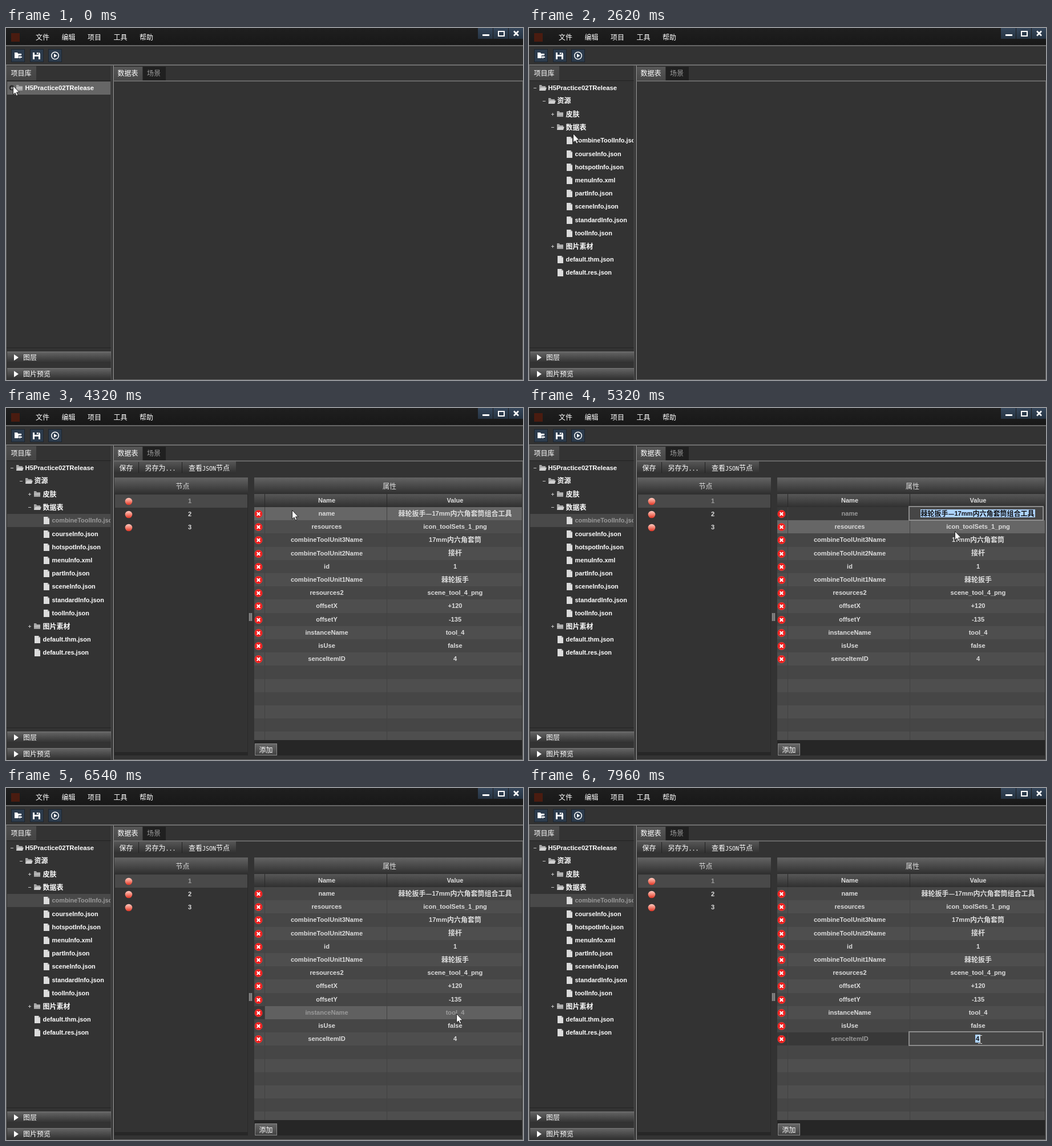
These frames come from a looping animation (906 px wide and 618 px high, 8000 ms). An HTML page with a canvas:

```html
<!DOCTYPE html>
<html lang="zh-CN">
<head>
<meta charset="utf-8">
<style>
html, body { margin: 0; width: 100%; height: 100%; overflow: hidden; background: #333; }
canvas { display: block; }
</style>
</head>
<body>
<canvas id="stage" width="906" height="618"></canvas>
<script>
const ctx = document.getElementById('stage').getContext('2d');
const LOOP = 8000, PITCH = 23.2;
const TREE_Y = 93.6, PROP_Y = 174;
const WHITE = '#fff', LIGHT = '#ddd', GREY = '#9a9a9a', BASE = '#333', HOVER = '#666', PICKED = '#494949', DARK = '#383838';

// name, depth, kind, stage at which it appears, stage at which it opens
const tree = [
  ['H5Practice02TRelease', 0, 'dir', 0, 1],
  ['资源', 1, 'dir', 1, 2],
  ['皮肤', 2, 'dir', 2, 9],
  ['数据表', 2, 'dir', 2, 3],
  ...['combineToolInfo.json', 'courseInfo.json', 'hotspotInfo.json', 'menuInfo.xml', 'partInfo.json',
    'sceneInfo.json', 'standardInfo.json', 'toolInfo.json'].map(n => [n, 3, 'file', 3]),
  ['图片素材', 2, 'dir', 2, 9],
  ['default.thm.json', 2, 'file', 2],
  ['default.res.json', 2, 'file', 2]
];
const props = [
  ['name', '棘轮扳手—17mm内六角套筒组合工具'],
  ['resources', 'icon_toolSets_1_png'],
  ['combineToolUnit3Name', '17mm内六角套筒'],
  ['combineToolUnit2Name', '接杆'],
  ['id', '1'],
  ['combineToolUnit1Name', '棘轮扳手'],
  ['resources2', 'scene_tool_4_png'],
  ['offsetX', '+120'],
  ['offsetY', '-135'],
  ['instanceName', 'tool_4'],
  ['isUse', 'false'],
  ['senceItemID', '4']
];

// cursor moves: first step, last step, number of steps, x, y
const moves = [
  [470, 850, 6, 27, 122], [1080, 1540, 7, 38, 162], [1620, 1770, 3, 39, 170], [1850, 1930, 2, 44, 173],
  [2540, 2850, 5, 127, 203], [3540, 3860, 5, 326, 163], [4320, 4320, 1, 501, 179], [4400, 4700, 5, 739, 186],
  [5240, 5780, 8, 768, 305], [5860, 5940, 2, 778, 328], [6020, 6240, 4, 789, 396],
  [6790, 6870, 2, 789, 416], [7245, 7420, 3, 786, 440]
];
// table edits: pressed, field opens, closes, row
const edits = [[5160, 5160, 6390, 0], [6390, 6710, 7090, 9], [7090, 7170, 7780, 10], [7780, 7870, 8000, 11]];

function cursorAt(t) {
  let x = 12, y = 101;
  for (const [a, b, n, tx, ty] of moves) {
    if (t < a) break;
    const k = n === 1 ? 1 : Math.min(n, Math.floor((t - a) / ((b - a) / (n - 1)) + 0.001) + 1) / n;
    x += (tx - x) * k;
    y += (ty - y) * k;
  }
  return { x: Math.round(x), y: Math.round(y) };
}

function box(x, y, w, h, fill) {
  ctx.fillStyle = fill;
  ctx.fillRect(x, y, w, h);
}
function fade(x, y, w, h, top, bottom) {
  const g = ctx.createLinearGradient(0, y, 0, y + h);
  g.addColorStop(0, top);
  g.addColorStop(1, bottom);
  box(x, y, w, h, g);
}
function poly(points, fill, line) {
  ctx.beginPath();
  for (let i = 0; i < points.length; i += 2) ctx.lineTo(points[i], points[i + 1]);
  ctx.closePath();
  ctx.fillStyle = fill;
  ctx.fill();
  if (line) { ctx.strokeStyle = line; ctx.lineWidth = 1; ctx.stroke(); }
}
function disc(x, y, r, fill) {
  ctx.beginPath();
  ctx.arc(x, y, r, 0, 7);
  ctx.fillStyle = fill;
  ctx.fill();
}
function cross(x, y, r, width) {
  ctx.strokeStyle = WHITE;
  ctx.lineWidth = width;
  ctx.beginPath();
  ctx.moveTo(x - r, y - r); ctx.lineTo(x + r, y + r);
  ctx.moveTo(x + r, y - r); ctx.lineTo(x - r, y + r);
  ctx.stroke();
}

// Chinese and Latin runs use different fonts; returns the width
function text(s, x, cy, color = WHITE, { bold = false, size = 11.1, center = false } = {}) {
  const runs = s.match(/[\u2014\u2e80-\uffef]+|[^\u2014\u2e80-\uffef]+/g).map(str => {
    const cjk = /[\u2014\u2e80-\uffef]/.test(str);
    const font = cjk ? `${bold ? 'bold ' : ''}12px "Noto Sans CJK SC", "Noto Sans CJK", sans-serif`
      : bold ? `bold ${size}px "Liberation Sans", Arial, sans-serif`
      : '10px "DejaVu Sans Mono", monospace';
    ctx.font = font;
    return { str, font, dy: cjk ? 4.5 : 4, w: ctx.measureText(str).width };
  });
  const width = runs.reduce((sum, r) => sum + r.w, 0);
  if (center) x -= width / 2;
  ctx.fillStyle = color;
  for (const r of runs) {
    ctx.font = r.font;
    ctx.fillText(r.str, x, Math.round(cy + r.dy));
    x += r.w;
  }
  return width;
}
const label = (s, x, y, color) => text(s, x, y, color, { center: true });
const strong = (s, x, y, color) => text(s, x, y, color, { center: true, bold: true });

function drawFrame() {
  box(0, 0, 906, 618, BASE);
  fade(0, 0, 906, 30, '#1f1f1f', '#181818');
  box(0, 30, 906, 2, '#676767');
  box(9, 9, 15, 15, '#4a1c10');
  ['文件', '编辑', '项目', '工具', '帮助'].forEach((s, i) => text(s, 52 + i * 45.5, 16));

  for (let i = 0; i < 3; i++) fade(827 + i * 27, 0, 26, 19, '#35465a', '#263443');
  box(835, 11, 12, 3, WHITE);
  ctx.strokeStyle = WHITE;
  ctx.lineWidth = 2;
  ctx.strokeRect(863, 6, 10, 8);
  cross(894, 9.5, 4, 2.6);

  for (const x of [9, 42, 74]) {
    box(x, 37, 24, 23, '#1c242d');
    box(x + 1, 38, 22, 21, '#2d3c4d');
  }
  poly([15, 43, 20, 43, 21, 45, 27, 45, 27, 48, 22, 48, 22, 53, 15, 53], WHITE);
  poly([22, 51, 25, 48.5, 25, 50, 28, 50, 28, 52, 25, 52, 25, 54], WHITE);
  poly([47, 43, 58, 43, 60, 45, 60, 55, 47, 55], WHITE);
  box(50, 43, 7, 4, '#2d3c4d');
  box(54, 43, 2, 3, WHITE);
  box(50, 50, 7, 5, '#2d3c4d');
  ctx.lineWidth = 1.5;
  ctx.beginPath();
  ctx.arc(86, 48.5, 6.3, 0, 7);
  ctx.stroke();
  poly([84, 45, 89.5, 48.5, 84, 52], WHITE);

  box(0, 64, 906, 2, '#707070');
  fade(1, 67, 52, 26, '#4d4d4d', '#444');
  label('项目库', 26.5, 79.5);
  box(1, 92, 184, 1, '#222');
  box(0, 66, 1, 552, '#666');
  box(184, 66, 1, 552, '#5c5c5c');
  box(185, 66, 2, 552, '#282828');
  box(187, 66, 2, 552, '#747474');
  fade(189, 68, 50, 24, '#575757', '#484848');
  label('数据表', 213.5, 79.5);
  box(240, 68, 40, 24, '#202020');
  label('场景', 259, 79.5, GREY);
  box(188, 92, 718, 2, '#686868');
  box(905, 93, 1, 525, '#686868');
  box(188, 617, 718, 1, '#686868');

  box(1, 561, 183, 1, '#242424');
  for (const [s, y] of [['图层', 568], ['图片预览', 597]]) {
    fade(2, y, 182, 20, '#666', '#303030');
    box(2, y, 182, 1, '#777');
    poly([14, y + 5, 22, y + 10.5, 14, y + 16], WHITE);
    text(s, 30, y + 10);
  }
}

function folder(x, y, open) {
  poly([x, y - 5, x + 4, y - 5, x + 5, y - 3, x + 11, y - 3, x + 11, y + 5, x, y + 5], '#a5a5a5');
  if (open) poly([x + 2.5, y - 0.5, x + 13, y - 0.5, x + 11, y + 5, x, y + 5], '#d0d0d0');
  else fade(x, y - 1, 11, 6, '#c0c0c0', '#999');
}
function page(x, y) {
  poly([x, y - 6, x + 7, y - 6, x + 10, y - 3, x + 10, y + 7, x, y + 7], '#dcdcdc');
  poly([x + 7, y - 6, x + 10, y - 3, x + 7, y - 3], '#999');
}

function drawTree(t, cur) {
  const stage = t < 250 ? 0 : t < 1000 ? 1 : t < 2160 ? 2 : 3;
  const firstHot = [0, 1, 2, 4][stage];
  const over = cur.x < 184 ? Math.floor((cur.y - TREE_Y) / PITCH) : -1;
  ctx.save();
  ctx.beginPath();
  ctx.rect(2, 93, 181, 460);
  ctx.clip();
  tree.filter(r => r[3] <= stage).forEach(([name, depth, kind, , opens], i) => {
    const top = Math.round(TREE_Y + i * PITCH), c = TREE_Y + 11 + i * PITCH;
    const cy = Math.round(c), x = Math.round(depth * 15.6);
    const picked = name === 'combineToolInfo.json' && t >= 3000;
    const hot = i === over && i >= firstHot;
    if (picked && t >= 3150) box(2, top, 182, 23, PICKED);
    else if (hot) box(2, top, 182, 23, HOVER);
    if (kind === 'dir') {
      const open = stage >= opens;
      if (hot) disc(x + 10, cy, 4.5, '#2a2a2a');
      box(x + 8, cy, 5, 1, '#c4c4c4');
      if (!open) box(x + 10, cy - 2, 1, 5, '#c4c4c4');
      folder(x + 18, cy, open);
    } else page(x + 19, cy);
    text(name, x + 33.5, c, picked ? GREY : WHITE, { bold: true, size: depth ? 10.9 : 11.3 });
  });
  ctx.restore();
}

function drawNodes(t, cur) {
  fade(189, 94, 214, 21, '#565656', '#303030');
  box(232, 95, 1, 19, '#222');
  box(308, 95, 1, 19, '#222');
  label('保存', 210.5, 105.5);
  label('另存为...', 270.5, 105.5);
  label('查看JSON节点', 356, 105.5);

  fade(190, 122, 234, 29, '#636363', '#2f2f2f');
  label('节点', 309.5, 137, LIGHT);
  box(190, 151, 1, 454, '#292929');
  box(423, 151, 1, 454, '#292929');
  box(190, 604, 234, 6, '#272727');
  const hot = cur.x > 190 && cur.x < 424 && cur.y >= 152 && cur.y < 175;
  box(191, 152, 232, 23, hot ? HOVER : PICKED);
  for (let i = 0; i < 3; i++) {
    const y = Math.round(164 + i * PITCH);
    const g = ctx.createLinearGradient(0, y - 6, 0, y + 6);
    g.addColorStop(0, '#ffc9be');
    g.addColorStop(0.5, '#f48474');
    g.addColorStop(1, '#e03626');
    disc(215, y, 6.3, g);
    strong(String(i + 1), 322, 163 + i * PITCH, i ? LIGHT : GREY);
  }
  for (let i = 0; i < 3; i++) box(426 + i * 2, 360, 1, 14, '#bbb');
}

function drawField(row, value, cy) {
  const top = Math.round(PROP_Y + row * PITCH) - 2;
  box(665, top, 237, 26, '#8c8c8c');
  box(667, top + 2, 233, 22, '#464646');
  const wide = Math.ceil(strong(value, 786, cy)) + 2;
  box(Math.round(786 - wide / 2), top + 6, wide, 14, '#add3ff');
  strong(value, 786, cy, '#111');
}

// returns whether the cursor is over an open field
function drawProps(t, cur) {
  fade(435, 122, 469, 29, '#636363', '#2f2f2f');
  label('属性', 672, 137, LIGHT);
  fade(435, 151, 469, 23, '#575757', '#303030');
  strong('Name', 562, 162, LIGHT);
  strong('Value', 787, 162, LIGHT);
  const edit = edits.find(e => t >= e[0] && t < e[2]);
  const over = cur.x > 435 ? Math.floor((cur.y - PROP_Y) / PITCH) : -1;
  for (let i = 0; i < 18; i++) {
    const top = Math.round(PROP_Y + i * PITCH), h = Math.min(583, Math.round(PROP_Y + (i + 1) * PITCH)) - top;
    const mine = edit && edit[3] === i, open = mine && t >= edit[1];
    const item = props[i];
    box(435, top, 469, h, open ? DARK : item && i === over ? (mine ? '#606060' : HOVER) : i % 2 ? '#4e4e4e' : '#464646');
    if (mine) box(435, top, 18, h, DARK);
    box(453, top, 1, h, '#414141');
    box(667, top, 1, h, '#414141');
    if (!item) continue;
    const cy = PROP_Y + 11 + i * PITCH, iy = Math.round(cy + 1);
    disc(442.5, iy, 7, '#e8433c');
    disc(442.5, iy, 6.2, '#f01c1c');
    cross(442.5, iy, 2.8, 2.2);
    strong(item[0], 562, cy, mine ? GREY : LIGHT);
    if (!open) strong(item[1], 787, cy, mine ? GREY : LIGHT);
  }
  box(453, 151, 1, 23, '#292929');
  box(667, 151, 1, 23, '#292929');
  if (edit && t >= edit[1]) drawField(edit[3], props[edit[3]][1], PROP_Y + 11 + edit[3] * PITCH);

  box(435, 583, 469, 27, '#262626');
  box(436, 589, 39, 21, '#8a8a8a');
  fade(437, 590, 37, 19, '#666', '#424242');
  label('添加', 455.5, 600);
  return edit && t >= edit[1] && over === edit[3] && cur.x > 665;
}

function drawCursor({ x, y }, beam) {
  if (beam) {
    const bx = x + 4, by = y - 6;
    for (const dy of [0, 14]) {
      box(bx - 3, by + dy, 3, 1, LIGHT);
      box(bx + 1, by + dy, 3, 1, LIGHT);
    }
    box(bx, by + 1, 1, 13, LIGHT);
    return;
  }
  poly([0.5, 0.5, 0.5, 16, 4, 12.8, 6.3, 18, 8.8, 17, 6.5, 11.9, 11.3, 11.9]
    .map((v, i) => v + (i % 2 ? y : x)), WHITE, '#222');
}

function draw(t) {
  const cur = cursorAt(t);
  let beam = false;
  drawFrame();
  drawTree(t, cur);
  if (t >= 3380) {
    drawNodes(t, cur);
    beam = drawProps(t, cur) || (t >= 5010 && t < 5160);
  }
  drawCursor(beam && t < 5240 ? { x: cur.x, y: cur.y + 7 } : cur, beam);
}

function tick(now) {
  draw(now % LOOP);
  requestAnimationFrame(tick);
}
draw(0);
requestAnimationFrame(tick);
</script>
</body>
</html>
```
